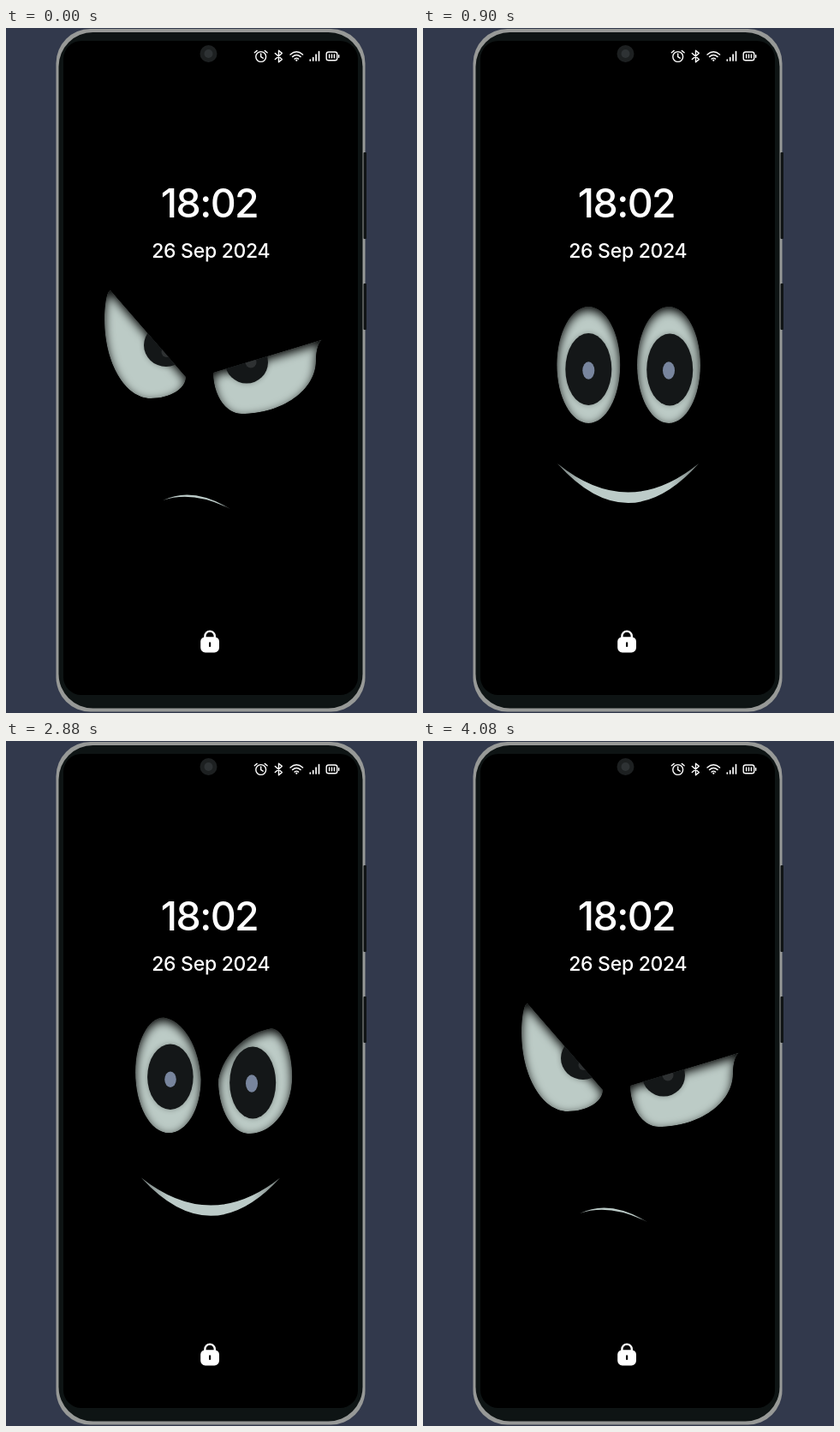
An HTML page that plays this animation: 480 by 799 pixels, repeating every 4500 ms.

```html
<!DOCTYPE html>
<html lang="en">
<head>
<meta charset="utf-8">
<title>Moody lock screen</title>
<style>
  html, body { margin: 0; width: 100%; height: 100%; overflow: hidden; background: #32394c; }
  svg { display: block; width: 100%; height: 100%; }
  text { font-family: Inter, "Open Sans", sans-serif; font-weight: 500; fill: #fff; text-anchor: middle; }
  .line { fill: none; stroke: #fff; stroke-linecap: round; stroke-linejoin: round; }
</style>
</head>
<body>
<svg viewBox="0 0 480 799">
  <defs>
    <filter id="shade" filterUnits="userSpaceOnUse" x="60" y="240" width="360" height="280">
      <feGaussianBlur stdDeviation="6"/>
    </filter>
    <filter id="halo" x="-30%" y="-30%" width="160%" height="160%">
      <feGaussianBlur stdDeviation="3"/>
    </filter>
    <linearGradient id="lip">
      <stop offset="0" stop-color="#bccbc8" stop-opacity=".6"/>
      <stop offset=".2" stop-color="#bccbc8"/>
      <stop offset=".8" stop-color="#bccbc8"/>
      <stop offset="1" stop-color="#bccbc8" stop-opacity=".6"/>
    </linearGradient>
  </defs>

  <rect width="480" height="799" fill="#32394c"/>

  <!-- phone -->
  <rect x="58.5" y="1" width="361" height="796.5" rx="40" fill="#979997"/>
  <rect x="61.5" y="5" width="355" height="788.5" rx="40" fill="#0e1414"/>
  <rect x="67" y="15" width="344" height="763" rx="21"/>
  <g fill="#101415">
    <rect x="417.5" y="145" width="3.5" height="101" rx="1"/>
    <rect x="417.5" y="298" width="3.5" height="54" rx="1"/>
  </g>
  <circle cx="236.5" cy="30" r="10" fill="#1d2021"/>
  <circle cx="236.5" cy="30" r="5" fill="#2e3234"/>

  <!-- status bar -->
  <g class="line" stroke-width="1.4">
    <circle cx="297.7" cy="33.5" r="5.9"/>
    <path d="M297.7 30V33.7L300.2 35.2M290.3 28.8L293.2 26.4M302.2 26.4L305.1 28.8"/>
    <path d="M314.3 29.4L322.3 36.6L318.5 39.8V26.2L322.3 29.4L314.3 36.6"/>
    <path d="M332 31Q339.3 24.6 346.6 31M334.5 33.6Q339.3 29.4 344.1 33.6M337 36.1Q339.3 34.2 341.6 36.1"/>
    <rect x="374.2" y="28" width="12.6" height="9.8" rx="2.6"/>
    <path d="M388.7 31.6V34.2M377.6 31V34.8M380.5 31V34.8M383.4 31V34.8"/>
  </g>
  <circle cx="339.3" cy="37.7" r="1.1" fill="#fff"/>
  <path class="line" stroke-width="1.7" d="M355.3 37V38M358.7 34.5V38M362.1 31V38M365.5 27.5V38"/>

  <text x="237.5" y="221" font-size="46.5" letter-spacing="-1.6">18:02</text>
  <text x="239.3" y="267.5" font-size="23" letter-spacing="-.3">26 Sep 2024</text>

  <g id="face"></g>

  <!-- lock -->
  <path class="line" stroke-width="2.4" d="M232.4 712V709.3A5.7 5.7 0 0 1 243.8 709.3V712"/>
  <rect x="227.2" y="710.2" width="21.8" height="18.2" rx="5.6" fill="#fff"/>
  <rect x="237" y="716.3" width="2.2" height="5.8" rx="1.1"/>
</svg>

<script>
const LOOP = 4500, STEP = 30;
const ARC = 0.5523; // handle length of a quarter ellipse
const face = document.getElementById('face');

function set(el, attrs) {
  for (const k in attrs) el.setAttribute(k, attrs[k]);
}

function add(parent, tag, attrs = {}) {
  const el = document.createElementNS('http://www.w3.org/2000/svg', tag);
  set(el, attrs);
  parent.append(el);
  return el;
}

const mix = (a, b, u) => a.map((v, i) => v + (b[i] - v) * u);

function ramp(t, from, to) {
  const p = Math.min(1, Math.max(0, (t - from) / (to - from)));
  return p * p * (3 - 2 * p);
}

// 0 is angry, 1 is happy
const mood = (t, [rise, risen, fall, fallen]) => ramp(t, rise, risen) - ramp(t, fall, fallen);

// Handles of a quarter arc that leaves a vertically and reaches b horizontally
const arc = (a, b) => [[a[0], a[1] + ARC * (b[1] - a[1])], [b[0] + ARC * (a[0] - b[0]), b[1]]];

// The lid, from tip to corner, is straight when angry and round when happy
function eyePath([tip, corner, low, side], u) {
  const round = arc(corner, tip).reverse();
  const lid = [mix(mix(tip, corner, 1 / 3), round[0], u), mix(mix(tip, corner, 2 / 3), round[1], u)];
  return `M${tip}C${[
    ...lid, corner,
    ...arc(corner, low), low,
    ...arc(side, low).reverse(), side,
    ...arc(side, tip), tip
  ].join(' ')}Z`;
}

// Same four points on the wide open eye; dir points to the nose
function openEye(cx, dir) {
  const cy = 393, rx = 37, ry = 68;
  return [[cx, cy - ry], [cx + dir * rx, cy], [cx, cy + ry], [cx - dir * rx, cy]];
}

const eyes = [
  {
    angry: [[122, 306], [210, 407], [169, 432], [115, 340]],
    happy: openEye(193.3, 1),
    pupil: [[187, 370, 26, 25], [193.3, 398, 27, 42]],
    dot: [[187.5, 378, 6, 6], [193.3, 399.5, 7, 10.3]],
    lid: [300, 810, 2785, 3210],
    look: [240, 800, 2740, 3200]
  },
  {
    angry: [[371, 363], [242, 402], [275, 450], [362, 388]],
    happy: openEye(287, -1),
    pupil: [[281, 390, 25, 24.5], [288.2, 398.5, 27, 42]],
    dot: [[286, 390, 6.5, 6.5], [287, 399.5, 7, 10.3]],
    lid: [250, 770, 2710, 3210],
    look: [340, 860, 2860, 3520]
  }
];
const smile = [240, 720, 2820, 3400];
const glint = [250, 630, 2860, 3520];

// Left corner, lower control, right corner, upper control
const frown = [183, 551, 218, 539, 262, 561, 218, 534];
const grin = [157, 508, 239.5, 600, 322, 508, 239.5, 575];

eyes.forEach((eye, i) => {
  const clip = add(face, 'clipPath', { id: 'eye' + i });
  eye.clip = add(clip, 'path');
  const g = add(face, 'g', { 'clip-path': `url(#eye${i})` });
  eye.white = add(g, 'path', { fill: '#bccbc6' });
  const shade = add(g, 'g', { filter: 'url(#shade)' });
  eye.shade = add(shade, 'path', { 'fill-rule': 'evenodd', transform: 'translate(0 4)' });
  eye.halo = add(g, 'ellipse', { opacity: .3, filter: 'url(#halo)' });
  eye.iris = add(g, 'ellipse', { fill: '#141718' });
  eye.core = add(g, 'ellipse');
});
const mouth = add(face, 'path', { fill: 'url(#lip)' });

function place(el, [cx, cy, rx, ry]) {
  set(el, { cx, cy, rx, ry });
}

function draw(t) {
  const glow = mix([46, 49, 50], [120, 133, 157], mood(t, glint)).map(Math.round);
  for (const eye of eyes) {
    const open = mood(t, eye.lid), look = mood(t, eye.look);
    const d = eyePath(eye.angry.map((p, i) => mix(p, eye.happy[i], open)), open);
    const pupil = mix(...eye.pupil, look);
    set(eye.clip, { d });
    set(eye.white, { d });
    set(eye.shade, { d: 'M0 200H480V600H0Z' + d });
    place(eye.halo, pupil);
    place(eye.iris, pupil);
    place(eye.core, mix(...eye.dot, look));
    set(eye.core, { fill: `rgb(${glow})` });
  }
  const [x0, y0, lx, ly, x1, y1, ux, uy] = mix(frown, grin, mood(t, smile));
  set(mouth, { d: `M${x0} ${y0}Q${lx} ${ly} ${x1} ${y1}Q${ux} ${uy} ${x0} ${y0}Z` });
}

const start = performance.now();
function tick() {
  const t = (performance.now() - start) % LOOP;
  draw(Math.floor(t / STEP) * STEP);
  requestAnimationFrame(tick);
}
tick();
</script>
</body>
</html>
```
